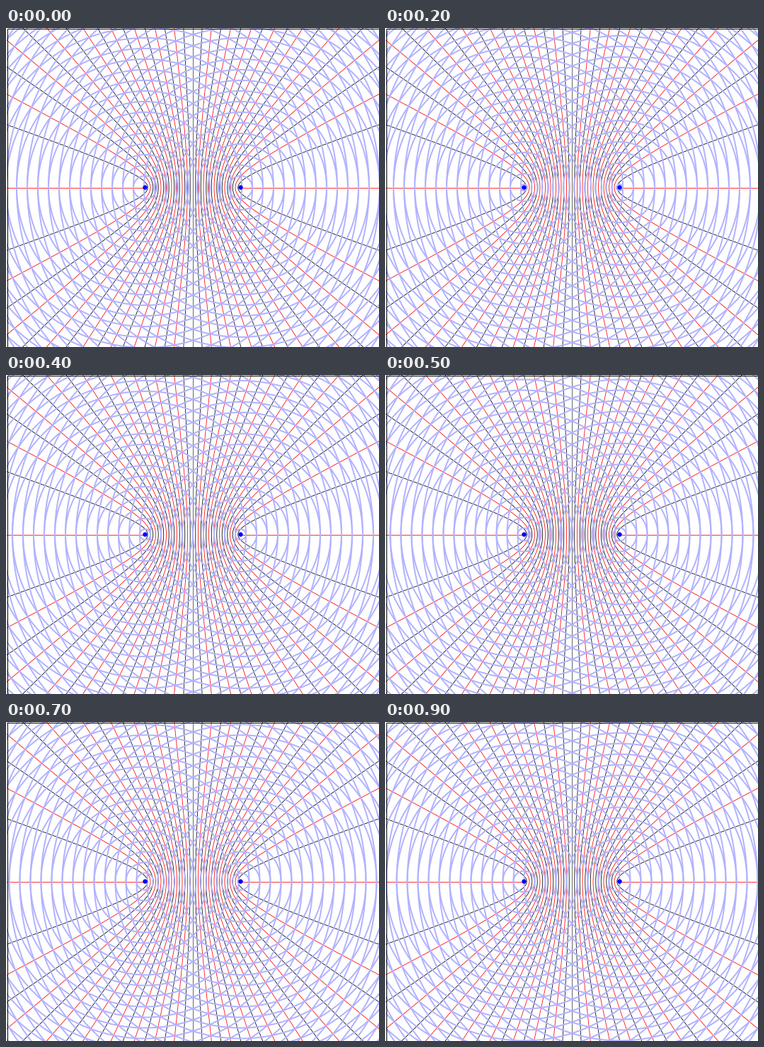
Write a matplotlib script that moves like this. It is 527 px wide and 451 px high and loops after 1 s.

```python
import numpy as np
import matplotlib.pyplot as plt
from matplotlib.animation import FuncAnimation
from matplotlib.collections import LineCollection
from matplotlib.patches import Circle, Rectangle

W, H, DPI = 527, 451, 64
PX = 72 / DPI                      # one pixel in points
LEFT, RIGHT = 1, W
CX, CY = (LEFT + RIGHT) / 2, H / 2
WAVELENGTH = 15
HALF_GAP = 4.5 * WAVELENGTH        # half the distance between the sources
FRAMES = 10
WAVES = 28
SOURCES = (CX - HALF_GAP, CX + HALF_GAP)

fig = plt.figure(figsize=(W / DPI, H / DPI), dpi=DPI, facecolor="white")
ax = fig.add_axes([LEFT / W, 0, (RIGHT - LEFT) / W, 1])
ax.set_xlim(LEFT, RIGHT)
ax.set_ylim(H, 0)
ax.axis("off")


def thin_line(x, y, color):
    ax.plot(x, y, color=color, lw=0.8 * PX, zorder=1)


# Curves of constant path difference, in steps of half a wavelength
dy = np.linspace(-CY - 5, CY + 5, 461)
for step in range(1, 18):
    a = HALF_GAP - step * WAVELENGTH / 4
    b = np.sqrt(HALF_GAP**2 - a**2)
    dx = a * np.sqrt(1 + (dy / b) ** 2)
    color = "black" if step % 2 else "red"
    for side in (-1, 1):
        thin_line(CX + side * dx, CY + dy, color)

thin_line([CX - 0.5] * 2, [0, H], "#404040")
thin_line([LEFT, SOURCES[0]], [CY, CY], "red")
thin_line([SOURCES[1], RIGHT], [CY, CY], "red")

waves = LineCollection([], colors="#b2b2ff", linewidths=2 * PX, zorder=2)
ax.add_collection(waves, autolim=False)

for x in SOURCES:
    ax.add_patch(Circle((x, CY), 3.2, fc="blue", ec="none", zorder=3))
ax.add_patch(Rectangle((LEFT + 0.5, 0.5), RIGHT - LEFT - 1, H - 1,
                       fill=False, ec="black", lw=PX, zorder=4))

angle = np.linspace(0, 2 * np.pi, 361)
unit_circle = np.column_stack([np.cos(angle), np.sin(angle)])


def update(frame):
    phase = (frame + 1) / FRAMES
    radii = WAVELENGTH * (np.arange(WAVES) + phase)
    waves.set_segments([r * unit_circle + (x, CY) for x in SOURCES for r in radii])
    return (waves,)


anim = FuncAnimation(fig, update, frames=FRAMES, interval=100, repeat=True)
plt.show()
```
